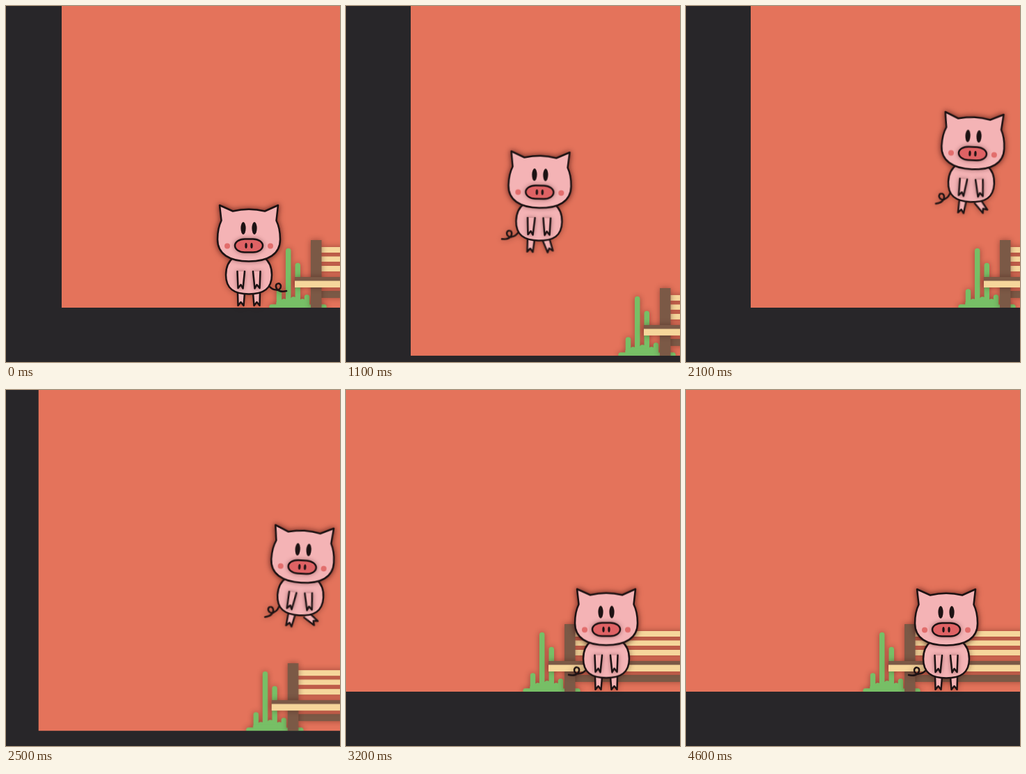
An HTML page that plays this animation: 480x511 px, repeating every 4.7 s.

```html
<!DOCTYPE html>
<html lang="en">
<head>
<meta charset="utf-8">
<title>Jumping pig</title>
<style>
  html, body { margin: 0; width: 100%; height: 100%; overflow: hidden; background: #e4735b; }
  svg { display: block; width: 100%; height: 100%; }

  .anim { animation: 4700ms linear infinite both; }
  .soft { filter: drop-shadow(0 0 4px rgba(60, 15, 10, .45)); }
  .lift { filter: drop-shadow(0 0 3px rgba(70, 20, 25, .45)); }

  .dark { fill: #282629; }
  .wood { fill: #7b5946; }
  .cream { fill: #f6d69b; }
  .grass { stroke: #77bf66; stroke-width: 7.5; stroke-linecap: round; fill: none; }
  .skin { fill: #f4b3b5; stroke: #1c1213; stroke-width: 2.5; stroke-linejoin: round; stroke-linecap: round; }
  .ink { fill: #1c1213; }
  .cheek { fill: #e26d6c; }

  /* camera */
  #cam-x { animation-name: cam-x; }
  #cam-y { animation-name: cam-y; }
  @keyframes cam-x {
    0%, 2.13% { transform: translateX(80px); }
    8.51%, 45.5% { transform: translateX(93px); }
    48.94% { transform: translateX(83px); }
    51.06% { transform: translateX(69px); }
    53.19% { transform: translateX(47px); }
    57.45% { transform: translateX(-10px); }
    59.57% { transform: translateX(-32px); }
    61.7% { transform: translateX(-41px); }
    63.83%, 100% { transform: translateX(-44px); }
  }
  @keyframes cam-y {
    0%, 14.89% { transform: translateY(433px); }
    17.02% { transform: translateY(443px); }
    19.15% { transform: translateY(463px); }
    21.28% { transform: translateY(487px); }
    23.4% { transform: translateY(502px); }
    25.53% { transform: translateY(495px); }
    27.66% { transform: translateY(485px); }
    29.79% { transform: translateY(464px); }
    31.91% { transform: translateY(445px); }
    34.04%, 45.74% { transform: translateY(433px); }
    48.94% { transform: translateY(450px); }
    51.06% { transform: translateY(469px); }
    53.19% { transform: translateY(489px); }
    55.32% { transform: translateY(501px); }
    57.45% { transform: translateY(493px); }
    59.57% { transform: translateY(473px); }
    61.7% { transform: translateY(447px); }
    63.83%, 100% { transform: translateY(433px); }
  }

  /* pig travel */
  #walk { animation-name: walk; }
  #jump { animation-name: jump; }
  @keyframes walk {
    0%, 5.32% { transform: translateX(269px); }
    12.77% { transform: translateX(221px); }
    20.85% { transform: translateX(166px); }
    23.4% { transform: translateX(185.5px); }
    44.68% { transform: translateX(319.5px); }
    59.57% { transform: translateX(425px); }
    61.7% { transform: translateX(424px); }
    63.83%, 100% { transform: translateX(418px); }
  }
  @keyframes jump {
    0%, 10.21% { transform: translateY(-2px); }
    12.77% { transform: translateY(-88px); }
    14.89% { transform: translateY(-141px); }
    16.38%, 23.4% { transform: translateY(-148px); }
    25.53% { transform: translateY(-116px); }
    27.66% { transform: translateY(-64px); }
    29.79% { transform: translateY(-14px); }
    30.85%, 41.06% { transform: translateY(-2px); }
    42.55% { transform: translateY(-64px); }
    44.68% { transform: translateY(-134px); }
    46.81%, 55.32% { transform: translateY(-148px); }
    57.45% { transform: translateY(-114px); }
    59.57% { transform: translateY(-58px); }
    61.7% { transform: translateY(-10px); }
    62.34%, 100% { transform: translateY(-2px); }
  }

  /* pig pose */
  #tilt { animation-name: tilt; transform-origin: 0 -103px; }
  #bob { animation-name: bob; animation-timing-function: ease-in-out; }
  #turn { animation-name: turn; animation-timing-function: step-end; }
  #tail { animation-name: tail; transform-origin: 30px -28px; }
  #leg-l { animation-name: leg-l; transform-origin: -11px -18px; }
  #leg-r { animation-name: leg-r; transform-origin: 11px -18px; }
  #arm-l { animation-name: arm-l; transform-origin: -11px -50px; }
  #arm-r { animation-name: arm-r; transform-origin: 11px -50px; }
  @keyframes tilt {
    0%, 5.32% { transform: rotate(0deg); }
    12.77% { transform: rotate(-.7deg); }
    21.28% { transform: rotate(0deg); }
    23.4% { transform: rotate(1.2deg); }
    44.68% { transform: rotate(2.7deg); }
    59.57% { transform: rotate(4deg); }
    63.83%, 100% { transform: rotate(0deg); }
  }
  @keyframes bob {
    0%, 63.83%, 97.87%, 100% { transform: none; }
    80.85% { transform: translateY(-2.5px); }
  }
  @keyframes turn {
    0% { transform: none; }
    20.85%, 100% { transform: scaleX(-1); }
  }
  @keyframes tail {
    0%, 5.32%, 63.83%, 100% { transform: rotate(0deg); }
    12.77% { transform: rotate(12deg); }
    23.4% { transform: rotate(8deg); }
    44.68% { transform: rotate(24deg); }
    59.57% { transform: rotate(27deg); }
  }
  @keyframes leg-l {
    0%, 5.32% { transform: rotate(0deg); }
    12.77% { transform: rotate(13deg); }
    23.4% { transform: rotate(2deg); }
    31.91% { transform: rotate(18deg); }
    38.3% { transform: rotate(-12deg); }
    44.68% { transform: rotate(5deg); }
    59.57% { transform: rotate(12deg); }
    63.83%, 100% { transform: rotate(0deg); }
  }
  @keyframes leg-r {
    0%, 5.32% { transform: rotate(0deg); }
    12.77% { transform: rotate(-11deg); }
    23.4% { transform: rotate(-19deg); }
    31.91% { transform: rotate(-20deg); }
    38.3% { transform: rotate(12deg); }
    44.68% { transform: rotate(-38deg); }
    59.57% { transform: rotate(-61deg); }
    63.83%, 100% { transform: rotate(0deg); }
  }
  @keyframes arm-l {
    0%, 23.4%, 63.83%, 100% { transform: rotate(0deg); }
    44.68% { transform: rotate(4deg); }
    59.57% { transform: rotate(9deg); }
  }
  @keyframes arm-r {
    0%, 23.4%, 63.83%, 100% { transform: rotate(0deg); }
    44.68% { transform: rotate(-5deg); }
    59.57% { transform: rotate(-5deg); }
  }

  #pointer { animation: pointer 4700ms linear infinite, blink 4700ms step-end infinite; }
  @keyframes pointer {
    0%, 78.72% { transform: translate(452px, 434px); }
    80.85% { transform: translate(396px, 347px); }
    82.98% { transform: translate(428px, 372px); }
    85.11%, 100% { transform: translate(484px, 410px); }
  }
  @keyframes blink {
    0% { opacity: 0; }
    78.5% { opacity: 1; }
    85.11%, 100% { opacity: 0; }
  }
</style>
</head>
<body>
<svg viewBox="0 0 480 511" preserveAspectRatio="none">
  <defs>
    <path id="arm" class="skin" d="M-16.5 -50 L-15.5 -26 L-11.5 -31 L-8.5 -25.5 L-6 -50" />
    <path id="leg" class="skin" d="M-16 -19 L-15.5 -1 L-11.5 -6 L-7.5 -1 L-6 -19" />
  </defs>
  <rect width="480" height="511" fill="#e4735b" />

  <!-- world origin: foot of the left wall -->
  <g id="cam-x" class="anim"><g id="cam-y" class="anim">
    <g class="soft">
      <path class="grass" d="M302 -1H356 M312.5 0V-23 M319.5 0V-9 M325.7 0V-81.5 M333 0V-12 M339.3 0V-60.5 M346 0V-9 M352.5 0V-15 M365 -1H377" />
      <path class="grass" d="M312 -6H340" />
    </g>
    <g class="soft">
      <path class="wood" d="M373 -24H900V-14H373Z" />
      <path class="cream" d="M373 -87H900V-79H373Z M373 -73.5H900V-66H373Z M373 -60H900V-52H373Z" />
    </g>
    <rect class="wood soft" x="358" y="-97" width="15.5" height="97" />
    <g class="soft">
      <path class="wood" d="M335 -44H900V-38H335Z" />
      <path class="cream" d="M335 -38.5H900V-29H335Z" />
    </g>

    <path class="dark" d="M-300 -700H0V0H900V300H-300Z" />

    <g id="walk" class="anim"><g id="jump" class="anim"><g id="tilt" class="anim"><g class="soft">
      <g id="leg-l" class="anim"><use href="#leg" /></g>
      <g id="leg-r" class="anim"><use href="#leg" transform="scale(-1 1)" /></g>
      <g id="bob" class="anim">
        <g id="turn" class="anim">
          <path id="tail" class="skin anim" style="fill:none" d="M29 -29 C35 -22 46 -21 46 -29 C46 -34 38 -34 39 -28 C40 -22 47 -20 54 -22" />
        </g>
        <path class="skin" d="M-22 -70 C-30 -64 -33 -56 -33 -45 C-33 -25 -21 -17.5 0 -17.5 C21 -17.5 33 -25 33 -45 C33 -56 30 -64 22 -70Z" />
        <g id="arm-l" class="anim"><use href="#arm" class="lift" /></g>
        <g id="arm-r" class="anim"><g transform="scale(-1 1)"><use href="#arm" class="lift" /></g></g>
        <path class="skin lift" d="M-42 -145 L-23 -136.5 Q0 -142 23 -136.5 L42 -145 L39.5 -123 C44 -114 45 -106 45 -96 C45 -75 28 -64.5 0 -64.5 C-28 -64.5 -45 -75 -45 -96 C-45 -106 -44 -114 -39.5 -123Z" />
        <ellipse class="ink" cx="-8" cy="-112" rx="3.6" ry="9" />
        <ellipse class="ink" cx="8" cy="-112" rx="3.6" ry="9" />
        <circle class="cheek" cx="-31" cy="-86.5" r="4" />
        <circle class="cheek" cx="31" cy="-86.5" r="4" />
        <rect class="skin lift" style="fill:#df6264" x="-20" y="-96.5" width="40" height="19" rx="14" ry="9.5" />
        <ellipse class="ink" cx="-4" cy="-87" rx="1.7" ry="4" />
        <ellipse class="ink" cx="4" cy="-87" rx="1.7" ry="4" />
      </g>
    </g></g></g></g>
  </g></g>

  <path id="pointer" d="M0 0 V19.5 L4.6 15.3 L8 23 L11.6 21.4 L8.2 14 H14.4Z" fill="#111" stroke="#fff" stroke-width="1.4" stroke-linejoin="round" />
</svg>
</body>
</html>
```
